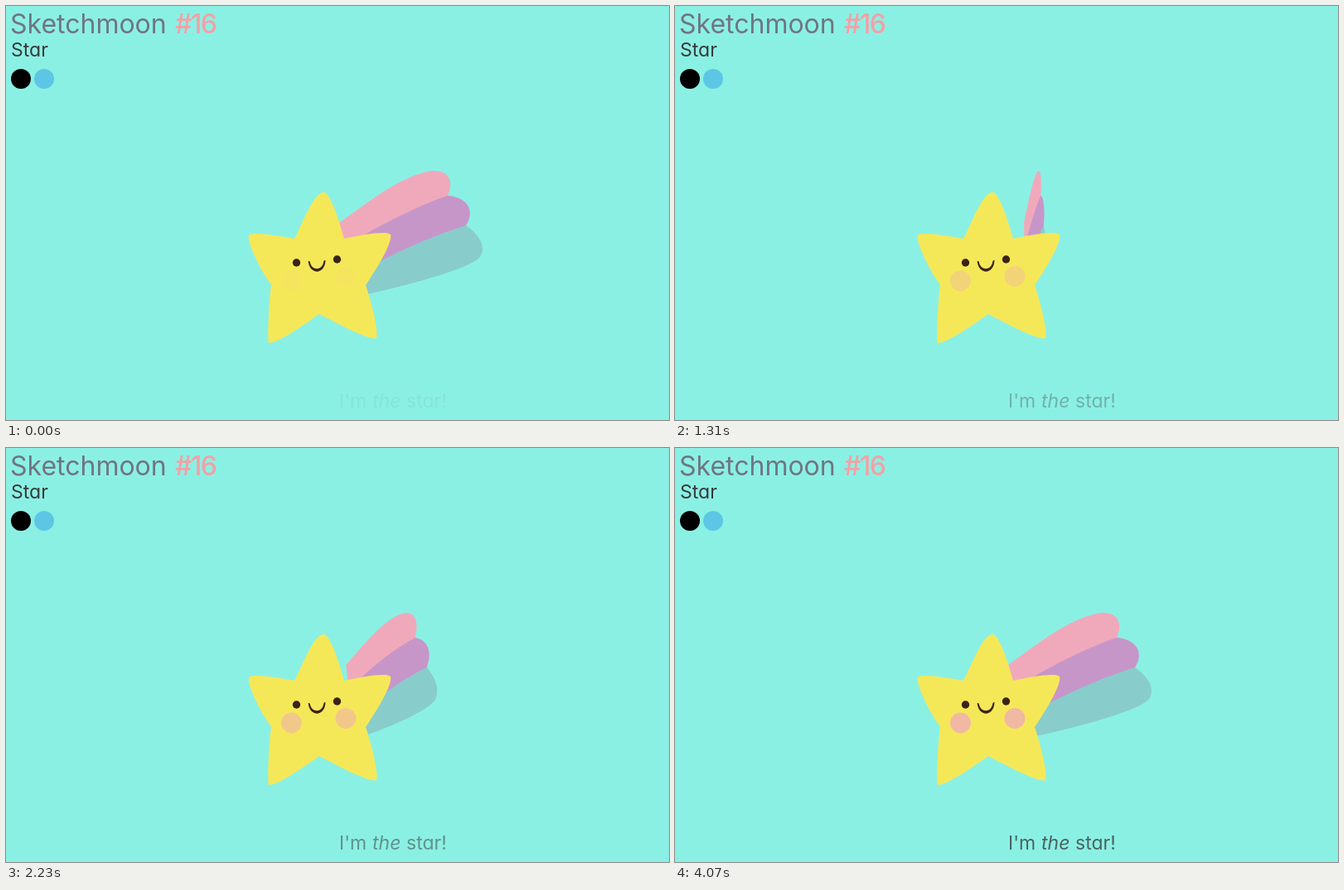
Animation of 800x500 px, one loop 4220 ms. Source, as an HTML page:

```html
<!DOCTYPE html>
<html lang="en">
<head>
<meta charset="utf-8">
<title>Star</title>
<style>
  html, body { margin: 0; height: 100%; overflow: hidden; background: #8bf0e4; }
  svg { display: block; width: 100%; height: 100%; }
  text { font: 23px Inter, Lato, sans-serif; font-feature-settings: "cv11"; fill: #383838; }
  .title { font-size: 32px; fill: #6f7581; }
  .number { font-size: 32px; font-weight: 500; letter-spacing: -1.5px; fill: #f3a0a5; }
  .slanted { font-style: italic; }
</style>
</head>
<body>
<svg viewBox="0 0 800 500">
  <text class="title" x="5" y="33">Sketchmoon</text>
  <text class="number" x="204" y="33">#16</text>
  <text x="6" y="61">Star</text>
  <circle cx="18" cy="88" r="12"/>
  <circle cx="46" cy="88" r="12" fill="#5cc6e4"/>

  <!-- Each band reaches under the one above it, so no gap shows -->
  <g id="tail">
    <path fill="#89cccc" d="M555 265C571 276 580 291 572 303C560 318 480 338 436 348L424 320L456 290L540 258Z"/>
    <path fill="#c796c9" d="M533 229C556 231 567 246 555 265C520 276 482 292 456 306L424 318L415 276L520 225Z"/>
    <path fill="#f0a9bb" d="M402 262C425 246 475 204 514 199C534 198 541 211 533 229C505 238.500 462 258.500 430 278L408 290Z"/>
  </g>

  <path fill="#f5e858" d="M348 281C358 262 371 226 383 225C391 225 401 256 408 281
    C430 276 460 271 464 276C467 285 447 318 434 337C440 355 450 392 447 401
    C441 405 402 385 378 372C361 384 329 407 317 407C315 400 317.500 356 320 336
    C310 325 290 285 293 277C298 272 330 278 348 281Z"/>
  <g fill="#3b2416">
    <circle cx="350.5" cy="310" r="4.7"/>
    <circle cx="399.5" cy="306" r="4.7"/>
    <path d="M364.7 308C366 325 385 325 385.5 307Q384 306.5 383.3 308.5C382 320 368.5 320 366.8 309Q366 307.5 364.7 308Z"/>
  </g>
  <g class="fade" fill="#f0a9bb">
    <circle cx="344.5" cy="332" r="12.5"/>
    <circle cx="410" cy="326.5" r="12.5"/>
  </g>
  <g class="fade">
    <text x="402" y="485">I'm</text>
    <text class="slanted" x="442" y="485">the</text>
    <text x="483" y="485">star!</text>
  </g>
</svg>
<script>
  const LOOP = 4220, RESTART = 510, GROW_START = 490, GROW_TIME = 3000, PIVOT = 424.5;
  const tail = document.getElementById('tail');
  const fading = document.querySelectorAll('.fade');

  // Same curve as CSS ease-in-out: cubic-bezier(.42, 0, .58, 1)
  function easeInOut(x) {
    let low = 0, high = 1;
    for (let i = 0; i < 20; i++) {
      const s = (low + high) / 2;
      const at = 1.26 * s * (1 - s) ** 2 + 1.74 * s * s * (1 - s) + s ** 3;
      if (at < x) low = s; else high = s;
    }
    return low * low * (3 - 2 * low);
  }

  function draw() {
    const time = performance.now() % LOOP;
    const seconds = time / 1000;
    const resting = time < RESTART;
    const scale = resting ? 1 : easeInOut(Math.min(1, (time - GROW_START) / GROW_TIME));
    const opacity = resting ? 0.06 : 0.02 + 0.261 * seconds - 0.0194 * seconds ** 2;

    tail.setAttribute('transform', `translate(${PIVOT} 0) scale(${scale} 1) translate(${-PIVOT} 0)`);
    fading.forEach(part => part.setAttribute('opacity', opacity));
    requestAnimationFrame(draw);
  }
  draw();
</script>
</body>
</html>
```
